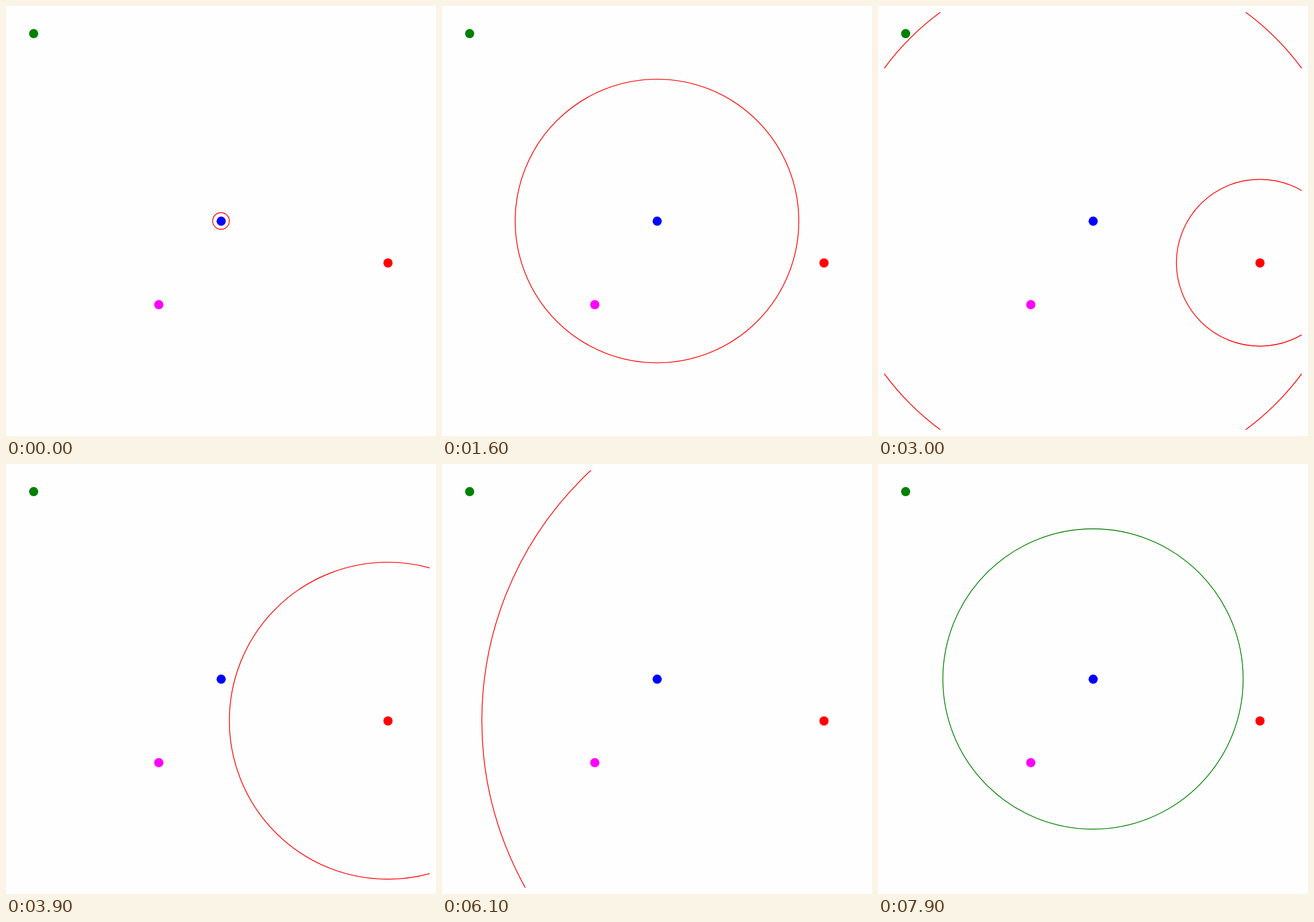
Recreate the animation shown at these times as an HTML page. Size 748 by 748 pixels, loop 8000 ms.

```html
<!DOCTYPE html>
<html lang="en">
<head>
<meta charset="utf-8">
<title>Expanding rings</title>
<style>
  :root { --u: 14.51px; }
  html, body { margin: 0; width: 100%; height: 100%; overflow: hidden; background: #fefefe; }
  svg { display: block; width: 748px; height: 748px; }
  .ring { fill: none; stroke-width: 1.4px; }

  /* Every ring grows by one unit per 100 ms; the tiny lead keeps steps off rounding edges. */
  .first  { animation: first 8s -1ms infinite; }
  .second { animation: second 8s -1ms infinite; }
  .third  { animation: third 8s -1ms infinite; }

  @keyframes first {
    0%   { r: var(--u); animation-timing-function: steps(80); }
    100% { r: calc(81 * var(--u)); }
  }
  @keyframes second {
    0%   { r: 0px; animation-timing-function: step-end; }
    25%  { r: 0px; animation-timing-function: steps(60); }
    100% { r: calc(60 * var(--u)); }
  }
  @keyframes third {
    0%     { r: 0px; animation-timing-function: step-end; }
    76.25% { r: 0px; animation-timing-function: steps(19); }
    100%   { r: calc(19 * var(--u)); }
  }
</style>
</head>
<body>
<svg viewBox="0 0 748 748">
  <clipPath id="plot"><rect x="11" y="11" width="726" height="726"/></clipPath>
  <g clip-path="url(#plot)">
    <circle class="ring first" cx="374" cy="374" stroke="#f00"/>
    <circle class="ring second" cx="664.2" cy="446.6" stroke="#f00"/>
    <circle class="ring third" cx="374" cy="374" stroke="#008000"/>
  </g>
  <circle cx="374.3" cy="374.3" r="8" fill="#00f"/>
  <circle cx="664.5" cy="447" r="8" fill="#f00"/>
  <circle cx="265.8" cy="519.5" r="8" fill="#f0f"/>
  <circle cx="48.1" cy="48.1" r="8" fill="#008000"/>
</svg>
</body>
</html>
```
